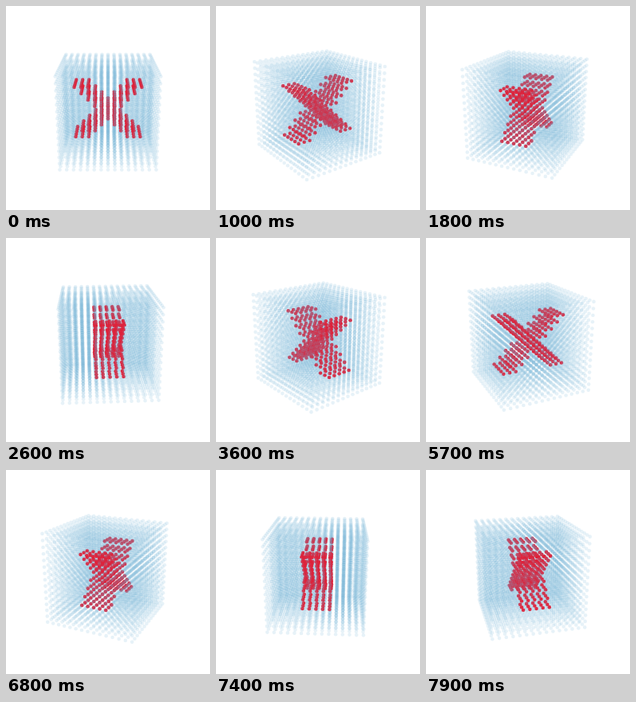
An HTML page with a canvas that plays this animation: 256x256 px, repeating every 8000 ms.

```html
<!DOCTYPE html>
<html lang="en">
<head>
<meta charset="utf-8">
<title>Rotating point cube</title>
<style>
  html, body { margin: 0; width: 100%; height: 100%; overflow: hidden; background: #fff; }
  canvas { display: block; width: 256px; height: 256px; }
</style>
</head>
<body>
<canvas id="stage" width="256" height="256"></canvas>
<script>
const ctx = document.getElementById('stage').getContext('2d');

const HALF = 7;                 // grid runs from -7 to 7 on each axis
const SPACING = 1 / (2 * HALF); // cube has side 1
const CENTER = 128, FOCAL = 474, DISTANCE = 4.217, RADIUS = 2.3;
const ELEVATION = 20 * Math.PI / 180;
const COS_E = Math.cos(ELEVATION), SIN_E = Math.sin(ELEVATION);
const STEP_MS = 100, STEPS = 80, STEP_ANGLE = 3.6 * Math.PI / 180;
const BLUE = 'rgba(107,174,214,.16)', RED = 'rgba(221,34,58,.95)';

// Two thick diagonals, five layers deep
const inCross = (i, j, k) =>
  Math.abs(j) <= 2 && Math.abs(i) <= 5 && Math.abs(k) <= 4 &&
  Math.abs(Math.abs(i) - Math.abs(k)) <= 1;

const points = [];
for (let i = -HALF; i <= HALF; i++)
  for (let j = -HALF; j <= HALF; j++)
    for (let k = -HALF; k <= HALF; k++)
      points.push({
        x: i * SPACING, y: j * SPACING, z: k * SPACING,
        color: inCross(i, j, k) ? RED : BLUE
      });

function project(p, cos, sin) {
  const right = p.x * cos + p.y * sin;
  const toward = p.y * cos - p.x * sin;
  p.depth = DISTANCE - toward * COS_E - p.z * SIN_E;
  const scale = FOCAL / p.depth;
  p.sx = CENTER + right * scale;
  p.sy = CENTER - (p.z * COS_E - toward * SIN_E) * scale;
}

function draw(step) {
  const cos = Math.cos(step * STEP_ANGLE), sin = Math.sin(step * STEP_ANGLE);
  for (const p of points) project(p, cos, sin);
  points.sort((a, b) => b.depth - a.depth);

  ctx.fillStyle = '#fff';
  ctx.fillRect(0, 0, 256, 256);
  for (const p of points) {
    ctx.fillStyle = p.color;
    ctx.beginPath();
    ctx.arc(p.sx, p.sy, RADIUS, 0, 2 * Math.PI);
    ctx.fill();
  }
}

let shown = -1;
function tick() {
  const step = Math.floor(performance.now() / STEP_MS) % STEPS;
  if (step !== shown) draw(shown = step);
  requestAnimationFrame(tick);
}
tick();
</script>
</body>
</html>
```
